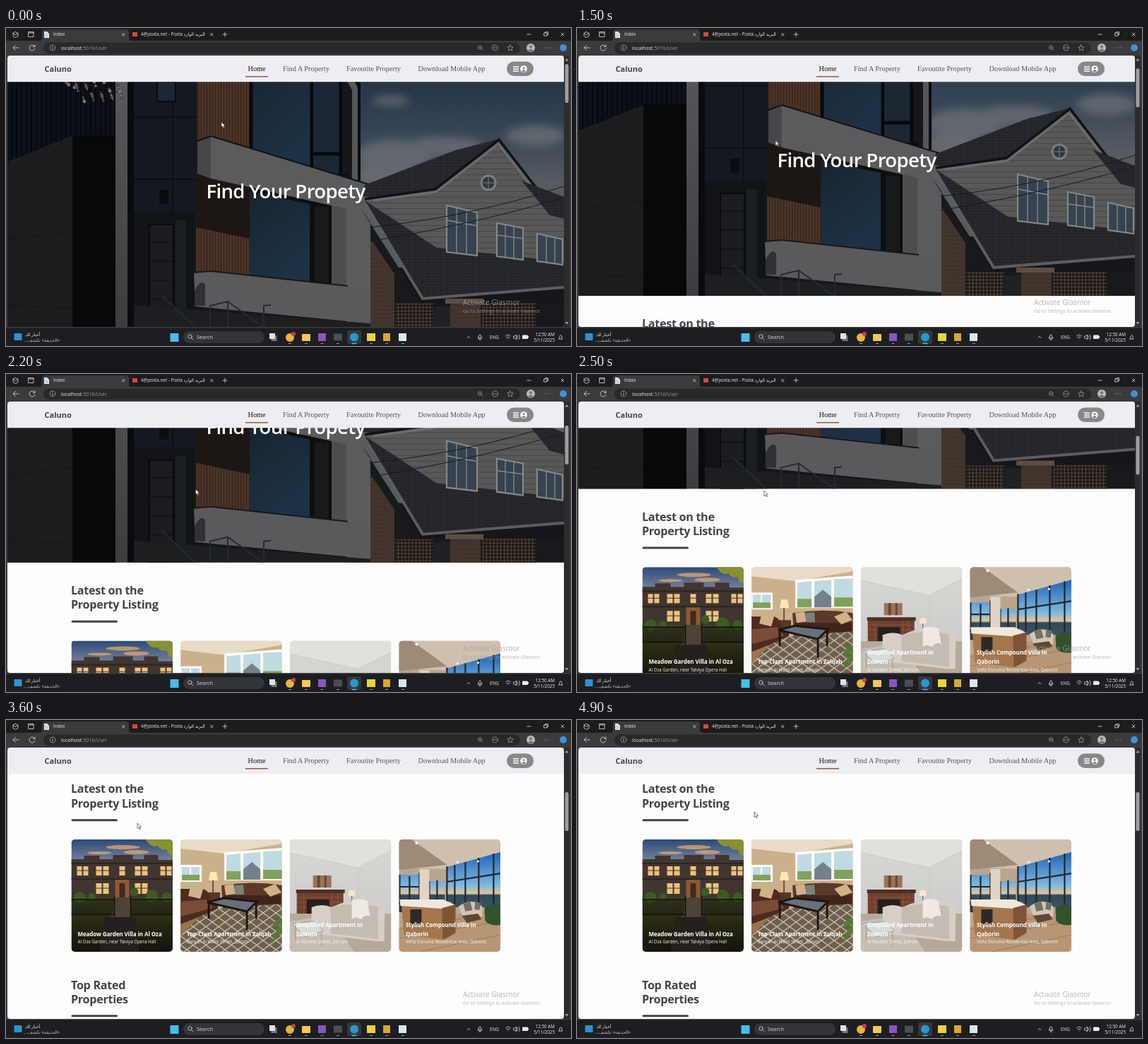
These frames come from a looping animation (800 by 450 pixels, 5000 ms). An HTML page:

```html
<!DOCTYPE html>
<html lang="en">
<head>
<meta charset="utf-8">
<title>Property listing</title>
<style>
html, body { margin: 0; height: 100%; overflow: hidden; background: #1c1c1c }
svg { display: block; width: 100vw; height: 100vh; font: 6.3px "Open Sans", "Noto Sans", "DejaVu Sans", sans-serif; fill: #eee }
.line { fill: none; stroke: #ccc; stroke-width: .9; stroke-linecap: round; stroke-linejoin: round }
.nav { font: 10.3px "Liberation Serif", serif; fill: #555 }
.head { font-size: 16.2px; font-weight: 700; letter-spacing: -.02em; fill: #444 }
.name { font-size: 8px; font-weight: 700; letter-spacing: -.01em; fill: #fff }
.place { font-size: 6.2px; fill: #f6f6f6 }
</style>
</head>
<body>
<svg viewBox="0 0 800 450">
<defs>
  <clipPath id="view"><rect x="2" y="39" width="788" height="384" rx="4"/></clipPath>
  <clipPath id="round"><rect width="143.5" height="159" rx="5"/></clipPath>
  <clipPath id="hero"><rect y="39" width="800" height="384"/></clipPath>
  <clipPath id="tab"><rect x="191" y="0" width="95" height="18"/></clipPath>
  <linearGradient id="sky" x2="0" y2="1"><stop stop-color="#1f2c42"/><stop offset=".35" stop-color="#364455"/><stop offset=".6" stop-color="#565b60"/></linearGradient>
  <linearGradient id="glass" x2=".5" y2="1"><stop stop-color="#182430"/><stop offset="1" stop-color="#1d3245"/></linearGradient>
  <linearGradient id="pillar" x2="0" y2="1"><stop stop-color="#5c5c5e"/><stop offset="1" stop-color="#3d3d3f"/></linearGradient>
  <linearGradient id="dusk" x2="0" y2="1"><stop stop-color="#2c4a78"/><stop offset=".5" stop-color="#75809a"/><stop offset="1" stop-color="#d9a060"/></linearGradient>
  <linearGradient id="lawn" x2="0" y2="1"><stop stop-color="#3f4420"/><stop offset=".5" stop-color="#26270f"/><stop offset="1" stop-color="#15130f"/></linearGradient>
  <linearGradient id="bay" x2="0" y2="1"><stop stop-color="#1f64b4"/><stop offset=".6" stop-color="#7fb8e0"/><stop offset=".75" stop-color="#e3c39a"/><stop offset=".78" stop-color="#2f4a5c"/><stop offset="1" stop-color="#3c525e"/></linearGradient>
  <linearGradient id="wall" x2="0" y2="1"><stop stop-color="#d9d8d5"/><stop offset="1" stop-color="#c6c6c5"/></linearGradient>
  <filter id="soft"><feGaussianBlur stdDeviation="6"/></filter>
  <pattern id="slats" width="4" height="9" patternUnits="userSpaceOnUse"><path d="M0 0h4v9H0z" fill="#4d3428"/><path d="M0 0h1.200v9H0z" fill="#33221b"/></pattern>
  <pattern id="ribs" width="7" height="9" patternUnits="userSpaceOnUse"><path d="M0 0h7v9H0z" fill="#0c1119"/><path d="M0 0h2v9H0z" fill="#06080c"/></pattern>
  <pattern id="boards" width="9" height="8" patternUnits="userSpaceOnUse"><path d="M0 0h9v8H0z" fill="#585857"/><path d="M0 7h9v1H0z" fill="#454545"/></pattern>
  <pattern id="tiles" width="9" height="4" patternUnits="userSpaceOnUse"><path d="M0 0h9v4H0z" fill="#28292e"/><path d="M0 3h9v1H0zM3 0h1v3H3z" fill="#212227"/></pattern>
  <pattern id="lattice" width="5" height="5" patternUnits="userSpaceOnUse"><path d="M0 0h5v5H0z" fill="#1d1815"/><path d="M0 0h5M0 0v5" stroke="#51443a" stroke-width="2"/></pattern>
  <pattern id="brick" width="8" height="6" patternUnits="userSpaceOnUse"><path d="M0 0h8v6H0z" fill="#46372f"/><path d="M0 0h8M4 0v3M0 3h8M0 3v3" stroke="#382c26"/></pattern>
  <pattern id="rug" width="18" height="13" patternUnits="userSpaceOnUse"><path d="M0 0h18v13H0z" fill="#6d5f4d"/><path d="M0 6.5L9 0l9 6.5L9 13z" fill="none" stroke="#cfc4b0" stroke-width="1.3"/></pattern>
  <pattern id="fence" width="3" height="9" patternUnits="userSpaceOnUse"><path d="M1 0v9" stroke="#100f0d"/></pattern>
</defs>

<!-- browser frame -->
<path d="M0 18h800v407H0z" fill="#3b3b3b"/>
<path d="M48 18q3 0 3-4V6q0-4 4-4h115q4 0 4 4v8q0 4 3 4z" fill="#3b3b3b"/>
<rect x="53" y="20.5" width="675" height="16" rx="8" fill="#292929"/>
<path class="line" d="M13.500 5.500l3.500 2v4l-3.500 2-3.500-2v-4zM10 7.500l3.500 2 3.500-2M32 5.500h7v7h-7zM32 7h7M164.500 7.500l3.500 3.500m0-3.500l-3.500 3.500M289.500 7.500l3.500 3.500m0-3.500l-3.500 3.500M310 6v6m-3-3h6M738 9h5M762 7h4v4h-4zM763.500 7V5.700h4v4H766M786 7l4 4m0-4l-4 4M18 28h-8m3.500-3.500L10 28l3.500 3.500M40.500 26a4 4 0 1 0 .5 3M41 24v2.500h-2.500M66 27.500v2.500M66 25.800v.1M763 28h.1M766.500 28h.1M770 28h.1"/>
<g class="line" style="stroke:#aaa;stroke-width:.7"><circle cx="66" cy="28" r="4"/><circle cx="671" cy="27.500" r="2.600"/><path d="M673 29.500l2 2M670 27.500h2M690 28h5M714 24l1.200 2.700 3 .3-2.200 2 .6 3-2.600-1.500-2.600 1.500.6-3-2.200-2 3-.3z"/><circle cx="692.500" cy="28" r="4"/></g>
<path d="M54 5h4l3 3v6h-7z" fill="#e9edf2"/><path d="M55 8h3M55 10h5M55 12h5" stroke="#6a9fca" stroke-width=".7"/>
<rect x="179" y="6" width="7" height="6" fill="#d9473c"/>
<circle cx="743" cy="28" r="6" fill="#bcb9b6"/><circle cx="743" cy="26.500" r="2" fill="#77736f"/><path d="M739 32q4-5 8 0-4 3-8 0" fill="#77736f"/>
<circle cx="789" cy="28" r="5" fill="#3d91dd"/>
<text x="67" y="11.300">Index</text>
<text x="191" y="11.300" clip-path="url(#tab)">4@poxta.net - Poxta البريد الوارد</text>
<text x="78" y="30.500" font-size="7">localhost<tspan fill="#999">:5016/User</tspan></text>

<g clip-path="url(#view)">
<rect y="39" width="800" height="384" fill="#fdfdfd"/>
<g id="page">
  <g clip-path="url(#hero)">
  <rect y="39" width="800" height="384" fill="#151619"/>
  <rect x="490" y="39" width="300" height="300" fill="url(#sky)"/>
  <g fill="#6c7074" opacity=".75" filter="url(#soft)"><ellipse cx="550" cy="180" rx="52" ry="22"/><ellipse cx="620" cy="168" rx="55" ry="14"/><ellipse cx="545" cy="103" rx="26" ry="7"/><ellipse cx="750" cy="152" rx="42" ry="15"/><ellipse cx="530" cy="208" rx="35" ry="16"/></g>
  <path d="M0 39h156v384H0z" fill="url(#ribs)"/>
  <path d="M0 190l95-38v271H0z" fill="#1c1c1e"/><path d="M0 300l95-12M0 392l95 5" stroke="#151517"/>
  <path d="M94 152h62v271H94z" fill="#070809"/>
  <path d="M155 39h17v384h-17z" fill="url(#pillar)"/><path d="M172 39h9v384h-9z" fill="#0a0b0e"/>
  <path d="M181 39h90v221h-90z" fill="#151820"/><path d="M181 126h90M181 214h90M236 39v221" stroke="#0c0d11" stroke-width="1.500"/>
  <path d="M214 76h26v28h-26z" fill="#1d2734" stroke="#090a0c" stroke-width="2"/>
  <path d="M181 260h85v163h-85z" fill="#121317"/><path d="M203 278h34v145h-34z" fill="#1b1c21" stroke="#08090b" stroke-width="2"/><path d="M204 303h32M204 330h32M204 357h32M204 384h32" stroke="#0d0e10"/><path d="M240 272h15v151h-15z" fill="#1b1f24"/>
  <path d="M217 229h13v20h-13z" fill="#0b0c0f"/>
  <path d="M271 39h76v134l-76-13z" fill="url(#slats)"/>
  <path d="M347 39h90v160l-90-25z" fill="url(#glass)"/><path d="M437 39h40v175h-40z" fill="#1c2734"/>
  <path d="M347 39v140M433 39v170M474 39v176M433 178h43" fill="none" stroke="#08090b" stroke-width="5"/>
  <path d="M464 39h14l22 42v130l-10 3V88z" fill="#55565a"/><path d="M477 39h12l13 40v137h-4V85z" fill="#0b0c0e"/>
  <path d="M269 206h215v160H269z" fill="#0e0e0f"/><path d="M269 282l76 16v52h-76z" fill="url(#slats)"/><path d="M269 206h76v92l-76-16z" fill="url(#slats)" opacity=".25"/>
  <path d="M345 231l85 18v110l-85-10z" fill="url(#glass)"/><path d="M437 253h20v107h-20z" fill="#17191b"/>
  <path d="M461 240h22v127h-22z" fill="#4c4d4f"/>
  <path d="M290 153l226 69v201h-34V256l-192-43z" fill="#5b5b5d"/><path d="M271 160l19-7v60l-19-7z" fill="#474749"/><path d="M271 160l19-7 226 69" fill="none" stroke="#111216" stroke-width="2"/>
  <path d="M266 346l24-2 194 21 32 6v47l-248-24z" fill="#5a5a5c"/><path d="M266 346l24-2 194 21" fill="none" stroke="#18181b" stroke-width="2"/>
  <path d="M181 392l335 26v5H181z" fill="#1d1e20"/><path d="M267 372q9-18 15-9v30h-15z" fill="#303134"/>
  <path d="M220 378l48 45M289 423v-30l25-6 50 36M365 423v-30l10-1M314 387v36" fill="none" stroke="#252a31" stroke-width="2"/>
  <!-- gabled house -->
  <path d="M697 161l93 106v97l-174-15-108-105 96-8z" fill="url(#boards)"/>
  <path d="M508 222l128-49 62-16-90 70-90 13-14-2z" fill="url(#tiles)"/>
  <path d="M508 242l100-14 90-70 78 101" fill="none" stroke="#101216" stroke-width="3.500"/><path d="M520 244l89-12 88-68 73 93" fill="none" stroke="#6c6c6c" stroke-width="3"/>
  <path d="M748 264h42v82h-42z" fill="url(#boards)"/><path d="M730 216l60 23v31l-20-5z" fill="url(#tiles)"/>
  <path d="M508 244l102 67 180 20v36l-200 16z" fill="url(#tiles)"/>
  <path d="M502 255l86 134h202v34H516V275z" fill="#18191c"/>
  <path d="M516 298l34 50v75h-34z" fill="url(#brick)"/><path d="M551 390h54v33h-54zM674 389h76v34h-76z" fill="url(#lattice)"/>
  <path d="M606 394h23v29h-23z" fill="#202124"/><path d="M629 385h43v38h-43z" fill="url(#brick)"/><path d="M622 383h54v7h-54z" fill="#5d4e42"/>
  <path d="M509 249l81 134 200-16" fill="none" stroke="#5d5d5e" stroke-width="4"/>
  <circle cx="683" cy="219" r="10" fill="#303740" stroke="#7c7c7c" stroke-width="3"/><path d="M673 219h20M683 209v20" stroke="#7c7c7c"/>
  <g fill="#35424f" stroke="#868685" stroke-width="2.200"><path d="M624 251l43 10v61l-43-5zM695 276l37 7v45l-37-5zM752 291l36 8v36l-36-5z"/><path d="M638 254v64M652 257v63M624 272l43 8M707 278v47M719 280v46M695 293l37 5M765 294v38M777 296v38" stroke-width="1.400"/></g>
  <path d="M515 282q140-14 275-58M515 302q150-25 275-62" fill="none" stroke="#17191d"/>
  <g id="blossom"></g>
  <text x="396" y="241" text-anchor="middle" font-size="27.6" font-weight="600" letter-spacing="-.67" fill="#fff">Find Your Propety</text>
  </g>
  <!-- listing -->
  <g class="head"><text x="92" y="468">Latest on the</text><text x="92" y="488.500">Property Listing</text><text x="92" y="745.500">Top Rated</text><text x="92" y="765.500">Properties</text></g>
  <path d="M94 506.500h62.500M94 783.500h62.500" stroke="#444" stroke-width="3" stroke-linecap="round"/>

  <g transform="translate(92.500 533.700)"><g clip-path="url(#round)">
    <path d="M0 0h144v60H0z" fill="url(#dusk)"/><g fill="#e1a96c" opacity=".75"><ellipse cx="73" cy="11" rx="24" ry="3"/><ellipse cx="92" cy="18" rx="18" ry="3"/><ellipse cx="40" cy="19" rx="17" ry="2"/></g>
    <path d="M105 0h39v24q-7-2-9-10-9 2-13-5-9 4-17-9z" fill="#879133"/>
    <path d="M0 28h18v-5h22v5h19v-6h28v6h16v-6h20v7h21v55H0z" fill="#40352f"/><path d="M0 34h144M0 56h144" stroke="#2b2421" stroke-width="2"/>
    <path d="M8 38h7v13H8zM17 38h7v13h-7zM35 38h8v13h-8zM45 38h8v13h-8zM68 38h8v13h-8zM90 38h8v13h-8zM100 38h8v13h-8zM126 38h7v13h-7zM135 38h7v13h-7zM35 62h8v15h-8zM45 62h8v15h-8zM90 62h8v15h-8zM100 62h8v15h-8z" fill="#edc27d"/><path d="M8 44h134M35 69h73" stroke="#40352f"/>
    <path d="M62 57h20v26H62z" fill="#8c5a34"/><path d="M68 62h8v21h-8z" fill="#432a1a"/>
    <path d="M0 82h144v77H0z" fill="url(#lawn)"/><path d="M62 82h20l9 77H46z" fill="#4c4339"/><path d="M46 110h45l5 49H40z" fill="#24201c"/>
    <g fill="#3d5a24"><circle cx="12" cy="82" r="8"/><circle cx="29" cy="81" r="5"/><circle cx="114" cy="80" r="9"/><circle cx="135" cy="82" r="7"/><circle cx="89" cy="74" r="6"/></g>
    <path d="M0 84h62v24H0zM84 84h60v24H84z" fill="url(#fence)"/><path d="M0 85h62M84 85h60M0 106h62M84 106h60M61 80v30M84 80v30" stroke="#151310" stroke-width="1.500"/>
  </g></g>

  <g transform="translate(247.100 533.700)"><g clip-path="url(#round)">
    <path d="M0 0h144v159H0z" fill="#cbb18b"/><path d="M0 0h144v6L62 20 0 13z" fill="#e8dcc7"/>
    <path d="M0 36h30v24H0zM62 18l82-6v46H62z" fill="#fbfaf4"/><path d="M2 39h11v19H2zM15 39h12v19H15zM65 22l20-2v37H65zM89 20l24-2v39H89zM117 17l27-1v40h-27z" fill="#bfdbe2"/>
    <path d="M2 50h25v8H2zM65 45h20v12H65zM117 43h27v13h-27z" fill="#83a05c"/><path d="M89 42l12-10 12 10v15H89z" fill="#75818a"/>
    <path d="M46 52v26" stroke="#725034" stroke-width="2"/><path d="M42 46h9l2 12H40z" fill="#ffe8af"/><path d="M38 75h18v18H38z" fill="#5a3624"/>
    <path d="M58 65q43-7 86 0v33H60z" fill="#5c382a"/><path d="M62 79h80v13H62z" fill="#40251d"/>
    <path d="M0 70h32q10 3 11 18l10 6v18L0 123z" fill="#4c2b21"/><path d="M0 88l36-3 10 12-46 12z" fill="#7a4c38"/>
    <path d="M14 67l18 3-4 14-17-4zM62 65l13-2 3 14-14 2zM117 70l17-7 9 12-16 6z" fill="#cfb285"/><path d="M76 65l13-1 1 14H78z" fill="#79837b"/>
    <path d="M0 121l52-23 92-7v68H0z" fill="url(#rug)"/><path d="M0 120l26-10-26 27z" fill="#9b754e"/>
    <path d="M38 89l23-6 47 5-14 14z" fill="#67707b" stroke="#1c1715" stroke-width="3"/><path d="M40 91v21M94 103v25M107 90v22" stroke="#1d1714" stroke-width="3"/>
    <path d="M144 111q-14 4-14 14 7-3 14-6-12 10-14 28 8-12 14-15z" fill="#527b34"/>
  </g></g>

  <g transform="translate(401.700 533.700)"><g clip-path="url(#round)">
    <path d="M0 0h144v159H0z" fill="url(#wall)"/><path d="M0 0h144v16L97 40 0 19z" fill="#e1e0dd"/><path d="M97 40v65M0 19l97 21 47-24" fill="none" stroke="#cbc9c5"/>
    <path d="M33 51h26v17H33z" fill="#9b735c"/><path d="M39 51h4v17h-4zM49 51h3v17h-3z" fill="#694634"/>
    <path d="M10 75h66v31H10z" fill="#70402f"/><path d="M10 82h66M10 89h66M10 96h66M20 75v31M60 75v31M68 75v31" stroke="#935b49" stroke-width=".7"/><path d="M9 71h69v5H9z" fill="#4b3026"/><path d="M24 85h32v20H24z" fill="#25201e"/>
    <path d="M0 105h144v54H0z" fill="#b6a999"/><path d="M0 116l55-9 36 52H0z" fill="#c7beb2"/>
    <path d="M88 80v12" stroke="#6b5848"/><path d="M84 72h8l1 8H83z" fill="#f5e7cb"/>
    <path d="M31 96q15-6 28 0l12-5q31-9 52-3 14 1 11 31v25h-12L31 133z" fill="#d6cfc7"/><path d="M58 96q30-8 67-1v46l-67-8z" fill="#c4bcb3"/><path d="M88 86q12-4 22 1l4 22q-7-4-13 4-9-5-13 0z" fill="#eee9e1"/>
    <path d="M3 119l31-3 14 13-26 9z" fill="#d7dcdc" stroke="#a3a19c"/><path d="M8 121v22M45 130v20" stroke="#9c9891"/>
  </g></g>

  <g transform="translate(556.400 533.700)"><g clip-path="url(#round)">
    <path d="M0 0h144v159H0z" fill="#baa58e"/><path d="M0 0h144v21L72 42 0 40z" fill="#cfc0ae"/><path d="M0 0h18l50 36-68 7z" fill="#9e8a76"/>
    <path d="M1 50h28v42H1zM43 59h22v30H43zM68 39l76-21v78H68z" fill="url(#bay)"/>
    <path d="M1 50v42M15 52v40M29 47v45M1 67h28M43 59v30M54 58v30M68 38v60M79 36v60M94 32v64M113 26v70M134 20v76M68 60l76-12" fill="none" stroke="#22262a" stroke-width="2.200"/>
    <path d="M29 42h14v55H29z" fill="#dfd4c6"/><path d="M0 87h32v16H0z" fill="#343130"/>
    <path d="M0 124l80-18 64-7v60H0z" fill="#b89674"/><path d="M0 140l144-24M30 159l114-24M0 127l100-17" stroke="#9c7958"/>
    <path d="M84 95q20-14 34 0v14l-26 4z" fill="#d1c5b5"/><path d="M91 91l10-3 3 12-10 2zM108 88l8 2-2 10-7-1z" fill="#766f64"/><path d="M89 108l23-3 5 8-21 5z" fill="#604733"/>
    <path d="M121 97q11-8 23-3v27q-16 2-22-6z" fill="#30522c"/>
    <path d="M3 88h70l7 6v39l-16 9-57-7z" fill="#a5764c"/><path d="M1 85h62l17 8-19 5L2 94z" fill="#f0e8de"/><path d="M61 97l19-5v40l-18 10z" fill="#7d5536"/><path d="M16 99h16v22H16z" fill="#2e2926"/>
    <g fill="#fff"><circle cx="83" cy="32" r="1.500"/><circle cx="112" cy="31" r="1.500"/><circle cx="25" cy="5" r="2"/></g>
  </g></g>

  <g class="name"><text x="101.500" y="670.500">Meadow Garden Villa in Al Oza</text><text x="256" y="670.500">Top-Class Apartment in Zalqah</text><text x="411" y="657.500">Simplified Apartment in</text><text x="411" y="670.500">Zorrum</text><text x="566" y="657.500">Stylish Compound Villa in</text><text x="566" y="670.500">Qaborin</text></g>
  <g class="place"><text x="101.500" y="681">Al Oza Garden, near Talviya Opera Hall</text><text x="256" y="681">Barqan Al Wadil Street, Zalqah</text><text x="411" y="681">Al Wadeer Street, Zorrum</text><text x="566" y="681">Velta Doruma Residential Area, Qaborin</text></g>
</g>

<!-- fixed navigation -->
<path d="M0 39h800v37.300H0z" fill="#edeef3"/>
<text x="54.500" y="62" font-size="11" font-weight="700" fill="#444">Caluno</text>
<g class="nav"><text x="342.500" y="61" fill="#111">Home</text><text x="392" y="61">Find A Property</text><text x="482" y="61">Favoutite Property</text><text x="583.500" y="61">Download Mobile App</text></g>
<path d="M339 68.700h32" stroke="#8a6238" stroke-width="1.500"/>
<rect x="709" y="47.500" width="38" height="20.500" rx="10.200" fill="#888"/>
<path d="M718 55h8M718 58h8M718 61h8" stroke="#fff" stroke-width="1.400"/><circle cx="733" cy="58" r="4.800" fill="#fff"/><circle cx="733" cy="56.500" r="1.600" fill="#888"/><path d="M730 61q3-4 6 0-3 2.500-6 0" fill="#888"/>
</g>

<path d="M790 39h8v384h-8z" fill="#2c2c2c"/><path d="M791.500 46.500h5L794 43zM791.500 416h5l-2.500 3.500z" fill="#9f9f9f"/>
<rect id="thumb" x="791.500" y="51" width="5" height="55" rx="2.500" fill="#9f9f9f"/>
<g fill="#a2a2a2" opacity=".78"><text x="647" y="391.500" font-size="10.200">Activate Glasmor</text><text x="647" y="403" font-size="6.900">Go to Settings to activate Glasmor.</text></g>

<!-- taskbar -->
<path d="M0 424.500h800V450H0z" fill="#1d1e21"/>
<rect x="11.500" y="432" width="11" height="10" rx="1" fill="#2e91d3"/>
<text x="27" y="435.500">أخبار لك</text><text x="76" y="443.500" direction="rtl" fill="#bbb">«الحديقة» تكشف....</text>
<rect x="232.500" y="432" width="12" height="12" fill="#45bdef"/>
<rect x="251" y="429" width="115" height="17" rx="8.500" fill="#333438"/><text x="270" y="440.300" font-size="7.300" fill="#ddd">Search</text>
<g class="line"><circle cx="260.500" cy="436.500" r="2.700"/><path d="M262.500 438.500l2.500 2.500M653 438.500l2-2 2 2M669.500 435.500a1.500 1.500 0 0 1 3 0v2a1.500 1.500 0 0 1-3 0zM668 437.500q0 3 3 3t3-3M671 440.500v1.500M707.500 436q3.500-4 7 0M709 438q2-2.200 4 0M711 440h.1M719 436h1.500l2-2v7l-2-2H719zM724 435.500q2 2 0 4M726 434q3 3.500 0 7M783 440h5q-1-1-1-4-1.500-3-3 0 0 3-1 4z"/></g>
<path d="M375.500 435h8v8h-8z" fill="#777"/><path d="M373 432h8v8h-8z" fill="#e2e2e2"/>
<rect x="483" y="428" width="20" height="19" rx="3" fill="#36373b"/>
<circle cx="402" cy="438" r="6" fill="#e4b63a"/><circle cx="407" cy="433" r="3" fill="#c8414b"/>
<rect x="419" y="433" width="12" height="10" rx="1" fill="#f4c758"/><rect x="442" y="432" width="11" height="11" fill="#8757bd"/><rect x="464" y="432.500" width="12" height="10" rx="1" fill="#4b4e53"/>
<circle cx="493" cy="437.500" r="6" fill="#2698ce"/><rect x="511" y="432" width="12" height="11" fill="#e9d43b"/><rect x="534" y="432" width="10" height="11" fill="#d9a82c"/><rect x="556" y="432" width="11" height="11" fill="#dce6ee"/>
<path d="M400 446.500h4M423 446.500h4M445.500 446.500h4M468 446.500h4M515 446.500h4M537 446.500h4M560 446.500h4" stroke="#999"/><path d="M489.500 446.500h7" stroke="#4cc2ff" stroke-width="1.500"/>
<text x="685" y="440">ENG</text><rect x="731" y="434.500" width="8" height="5.500" rx="1"/><path d="M739 436h1v2.500h-1z"/>
<g text-anchor="end"><text x="777" y="435.500">12:50 AM</text><text x="777" y="443.500">5/11/2025</text></g>
<path id="cursor" d="M0 0v7.500l1.700-1.600 1.300 2.900 1.300-.6-1.300-2.800h2.500z" fill="#fff" stroke="#222" stroke-width=".6"/>
</svg>
<script>
const el = id => document.getElementById(id);
const notch = 52.1;
const notchStarts = [1350, 1750, 2050, 2150, 2250, 2850, 3350];
const path = [[0, 305, 133], [1500, 281, 159], [2000, 271, 162], [2500, 265, 165],
              [3200, 279, 146], [3600, 186, 146], [4900, 251, 130]];

function scrollAt(t) {
  return notchStarts.reduce((sum, start) => {
    const p = Math.min(1, Math.max(0, (t - start) / 200));
    return sum + notch * p * p * (3 - 2 * p);
  }, 0);
}

function cursorAt(t) {
  const i = Math.max(1, path.findIndex(k => k[0] >= t));
  const [a, x, y] = path[i - 1], [b, u, v] = path[i];
  const p = (t - a) / (b - a);
  return [x + (u - x) * p, y + (v - y) * p];
}

// twigs of blossom at the top left
let flowers = '<path d="M70 72q40 2 74 22M98 76q12 9 14 30M116 80l48 12" fill="none" stroke="#20191a"/>';
for (let i = 0; i < 46; i++) {
  const x = 84 + (i * 37 % 86), y = 76 + (i * 17 % 29) * (x > 98 ? 1 : .3);
  flowers += `<circle cx="${x}" cy="${y}" r="${1 + i % 3 * .7}" fill="${i % 2 ? '#83706b' : '#5b4643'}"/>`;
}
el('blossom').innerHTML = flowers;

function draw(now) {
  const t = Math.floor(now % 5000 / 100) * 100;
  const s = scrollAt(t);
  el('page').setAttribute('transform', `translate(0 ${-s})`);
  el('thumb').setAttribute('y', 51 + s * .14);
  el('cursor').setAttribute('transform', `translate(${cursorAt(t)})`);
  requestAnimationFrame(draw);
}
draw(performance.now());
</script>
</body>
</html>
```
